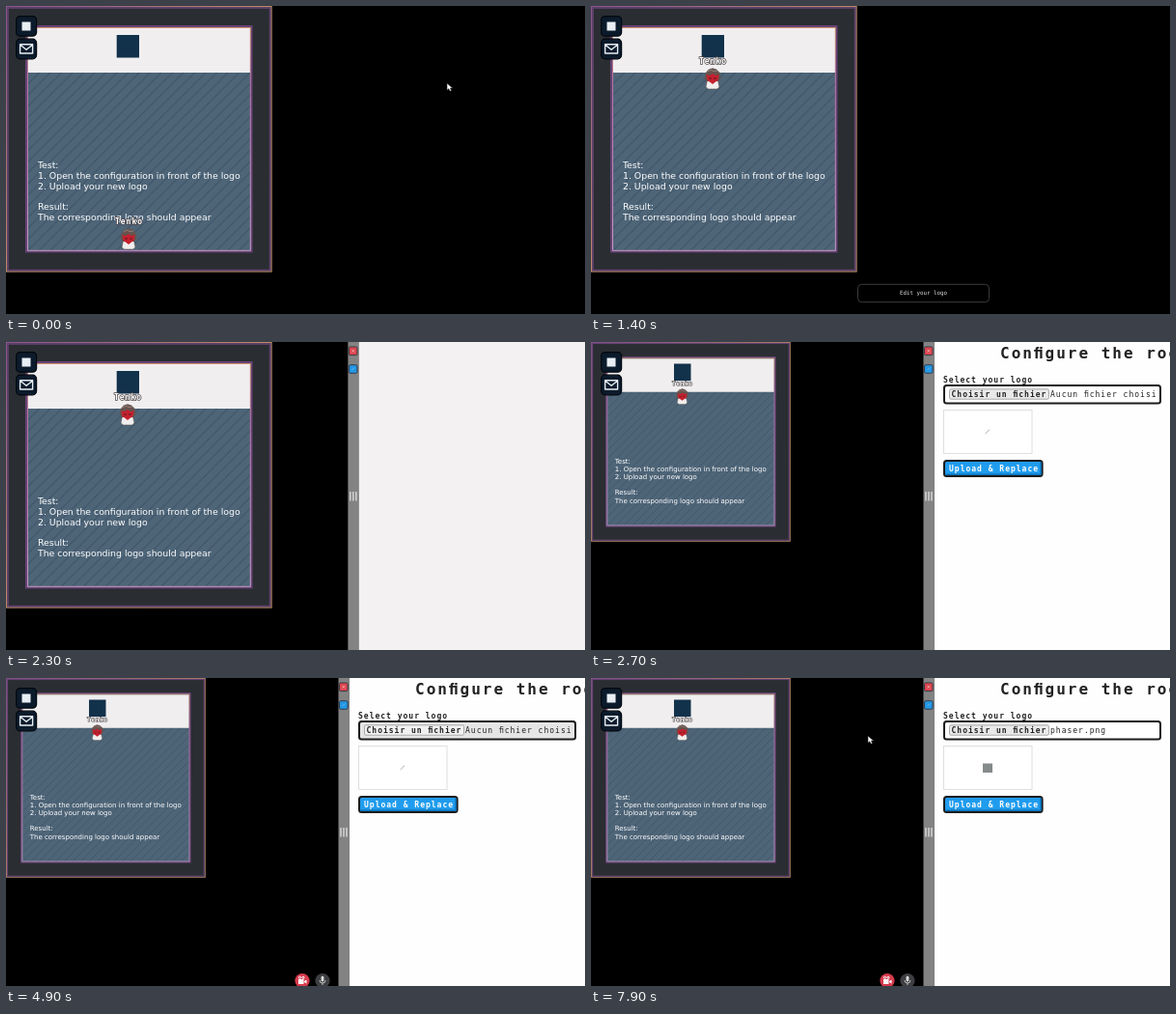
These frames come from a looping animation (600x319 px, 8000 ms). An HTML page:

```html
<!DOCTYPE html>
<html lang="en">
<head>
<meta charset="utf-8">
<title>Edit your logo</title>
<style>
  html, body { margin: 0; width: 100%; height: 100%; overflow: hidden; background: #000; }
  svg { display: block; width: 600px; height: 319px; }
  .sans { font: 9.33px "DejaVu Sans", sans-serif; fill: #fff; }
  .mono { font: 5.8px "DejaVu Sans Mono", monospace; }
  .pixel { font: bold 8px "DejaVu Sans Mono", monospace; letter-spacing: 1px; fill: #222; }
  .title { font-size: 16px; letter-spacing: 2px; }
</style>
</head>
<body>
<svg viewBox="0 0 600 319">
  <defs>
    <linearGradient id="edge" x1="0" y1="0" x2="1" y2="1">
      <stop offset="0" stop-color="#8a5590"/>
      <stop offset=".5" stop-color="#c08a68"/>
      <stop offset="1" stop-color="#b98a62"/>
    </linearGradient>
    <linearGradient id="trim" x1="0" y1="0" x2="0" y2="1">
      <stop offset="0" stop-color="#d0906c"/>
      <stop offset=".25" stop-color="#b873a4"/>
      <stop offset="1" stop-color="#c79ac2"/>
    </linearGradient>
    <pattern id="stripes" width="11.5" height="11.5" patternUnits="userSpaceOnUse">
      <path d="M-1 12.5L12.5 -1M-1 1L1 -1M10.5 12.5L12.5 10.5" stroke="#3d5165" stroke-width="1"/>
    </pattern>
    <path id="arrow" d="M0 0V7.2L1.8 5.7L3.1 8.2L4.6 7.4L3.4 5.1H5.8Z" fill="#fff" stroke="#222" stroke-width=".6"/>
    <path id="hand" d="M-1 0Q0 -1.4 1 0V4L5 5V9L4 12H-1.5L-4.5 7.5Q-4.5 6 -3 6.5L-1 8Z" fill="#fff" stroke="#111" stroke-width=".9"/>
  </defs>
  <rect width="600" height="319"/>

  <g id="game">
    <rect width="275.5" height="275.5" fill="#2a2d31"/>
    <rect x=".6" y=".6" width="274.4" height="274.4" fill="none" stroke="url(#edge)" stroke-width="1.2"/>
    <rect x="2" y="2" width="271.6" height="271.6" fill="none" stroke="#634272" stroke-width="1.6"/>
    <rect x="21" y="21" width="233.5" height="233.5" fill="#4e6578" stroke="#654376" stroke-width="2"/>
    <rect x="23" y="69" width="230" height="184" fill="url(#stripes)"/>
    <rect x="23" y="23" width="230" height="46" fill="#f0eeef"/>
    <rect x="22.5" y="22.5" width="230.8" height="230.8" fill="none" stroke="url(#trim)"/>
    <rect x="114.7" y="30" width="23.3" height="23.5" fill="#12314b"/>
    <g class="sans" id="notes"></g>
    <g id="avatar">
      <path d="M-5.5 2H5.5L7 9L4.5 11H-4.5L-7 9Z" fill="#f1eeee" stroke="#5b5352" stroke-width=".6"/>
      <path d="M-8.5 0L-7 -6L-4 -9.5L0 -10.8L4 -9.5L7.5 -6L8.5 0L6 3H-6Z" fill="#67544f"/>
      <path d="M-5 -7L-2 -9L1 -7.5L5 -8" stroke="#93807a" fill="none"/>
      <path d="M-6.5 -4L-3 -3L0 -5L3 -3L6.5 -4L5.5 2L2.5 4L0 6L-2.5 4L-5.5 2Z" fill="#c5202e"/>
      <path d="M-4 0H-1M1 0H4" stroke="#5c1b24"/>
      <text class="pixel" text-anchor="middle" x=".5" y="-15" style="fill:#fff;stroke:#4a4346;stroke-width:1.4;paint-order:stroke">Tenko</text>
    </g>
  </g>

  <g fill="#0c1b2c" stroke="#03080f" stroke-width="1.2">
    <rect x="10.6" y="10.6" width="21" height="20.6" rx="4"/>
    <rect x="10.6" y="34.2" width="21" height="20.6" rx="4"/>
  </g>
  <rect x="16.5" y="16.5" width="9" height="9" fill="#e8eef4"/>
  <path d="M14.6 39.8H27.6V49H14.6ZM14.8 40.3L21.1 45.3L27.4 40.3" fill="none" stroke="#e8eef4" stroke-width="1.4" stroke-linejoin="round"/>

  <g id="popup">
    <rect x="276.5" y="288.3" width="136" height="18.4" rx="4" fill="#000" stroke="#3c3c3c"/>
    <text class="mono" x="344.5" y="299" text-anchor="middle" fill="#e4e4e4">Edit your logo</text>
  </g>

  <g id="media">
    <circle cx="307" cy="313.5" r="7.6" fill="#d63a4c"/>
    <path d="M303 312H308.5V317H303ZM309 314L311.5 312.5V316.5L309 315Z" fill="#fff"/>
    <g fill="none" stroke="#fff"><circle cx="304.5" cy="310.3" r="1.1"/><circle cx="308" cy="310.3" r="1.1"/></g>
    <circle cx="328" cy="313.5" r="7.6" fill="#3e3f42"/>
    <rect x="326.6" y="308.8" width="2.8" height="5.6" rx="1.4" fill="#ddd"/>
    <path d="M325 313Q325 316 328 316Q331 316 331 313M328 316V318" fill="none" stroke="#ddd" stroke-width=".8"/>
  </g>

  <g id="panel">
    <rect id="sheet" x="11" width="260" height="319"/>
    <rect width="11" height="319" fill="#838383"/>
    <path d="M2.5 155V164.5M5.5 155V164.5M8.5 155V164.5" stroke="#f2f2f2" stroke-width="1.1"/>
    <g stroke="#2c3440" stroke-width=".9">
      <rect x="1" y="5" width="8.6" height="8.6" rx="1.4" fill="#dd4750"/>
      <rect x="1" y="23.7" width="8.6" height="8.6" rx="1.4" fill="#2496e3"/>
    </g>
    <path d="M4 8L6.6 10.6M6.6 8L4 10.6" stroke="#f4b6b9" stroke-width=".8"/>
    <path d="M4 29.3L6.6 26.7" stroke="#77c1f4" stroke-width=".8"/>
  </g>

  <g id="page" class="pixel">
    <text class="title" x="424" y="17">Conﬁgure the room</text>
    <text x="365" y="42">Select your logo</text>
    <rect id="field" x="366" y="45" width="224" height="18.6" rx="2.5" stroke="#1c1c1c" stroke-width="2"/>
    <rect id="choose" x="371.5" y="48.8" width="103" height="10.4" rx="1.5" stroke="#999" stroke-width=".8"/>
    <text x="373.5" y="57">Choisir un ﬁchier</text>
    <text id="file" x="476" y="57" font-weight="normal"></text>
    <rect x="365.5" y="70.5" width="91.5" height="45" fill="#fff" stroke="#dcdcdc" stroke-width=".9"/>
    <path id="missing" d="M408.5 95L413 90.7" stroke="#999" stroke-width=".8"/>
    <rect id="preview" x="406" y="88.5" width="10" height="9.5" fill="#858b8b"/>
    <rect x="366" y="123" width="101.6" height="16" rx="2.5" fill="#209cee" stroke="#1c1c1c" stroke-width="2"/>
    <path d="M367.5 137.3H466V124.5" fill="none" stroke="#0b72ba" stroke-width="1.5"/>
    <text x="371" y="133.5" style="fill:#fff">Upload &amp; Replace</text>
  </g>

  <use id="pointer"/>
</svg>
<script>
const LOOP = 8000;
const $ = id => document.getElementById(id);
const show = (id, on) => $(id).style.display = on ? "" : "none";
const set = (id, name, value) => $(id).setAttribute(name, value);
const move = (id, x, y) => set(id, "transform", `translate(${x} ${y})`);
const ramp = (t, from, to) => Math.min(1, Math.max(0, (t - from) / (to - from)));
const ease = p => (1 - Math.cos(Math.PI * p)) / 2;
const mix = (a, b, p) => a + (b - a) * p;

["Test:", "1. Open the configuration in front of the logo", "2. Upload your new logo", "",
 "Result:", "The corresponding logo should appear"].forEach((line, i) => {
  const text = document.createElementNS("http://www.w3.org/2000/svg", "text");
  text.setAttribute("x", 33);
  text.setAttribute("y", 168 + i * 10.8);
  text.textContent = line;
  $("notes").append(text);
});

// Pointer legs: start, end, x1, y1, x2, y2
const legs = [
  [0, 300, 457, 80, 457, 80],
  [2900, 3600, 360, 210, 425, 59],
  [3600, 4500, 425, 59, 425, 59],
  [6500, 7000, 425, 59, 420, 66],
  [7000, 7500, 420, 66, 207, 79],
  [7500, 7900, 207, 79, 207, 79],
  [7900, 8000, 287, 60, 287, 60],
];

function drawPointer(t) {
  const leg = legs.find(([a, b]) => t >= a && t < b);
  show("pointer", leg);
  if (!leg) return;
  const [a, b, x1, y1, x2, y2] = leg;
  const p = ease(ramp(t, a, b)), x = mix(x1, x2, p), y = mix(y1, y2, p);
  const overField = x > 365 && y > 44 && y < 65;
  set("pointer", "href", overField ? "#hand" : "#arrow");
  move("pointer", x, y);
}

function draw(t) {
  const walk = ramp(t, 100, 1250);
  const step = walk > 0 && walk < 1 ? Math.abs(Math.sin(t / 90)) * 0.6 : 0;
  move("avatar", mix(127, 126, walk), mix(241, 75, walk) - step);
  set("game", "transform", `scale(${t < 2400 ? 1 : 0.75})`);

  show("popup", t >= 900 && t < 1950);
  show("media", t >= 2800);

  show("panel", t >= 2058);
  move("panel", mix(600, 344.5, ease(ramp(t, 2058, 2336))), 0);
  const loaded = t >= 2600, chosen = t >= 6500, hover = t >= 3500 && !chosen;
  set("sheet", "fill", loaded ? "#fefefe" : "#f3f1f2");
  show("page", loaded);
  set("field", "fill", hover ? "#e5e5e5" : "#fff");
  set("choose", "fill", hover ? "#f1f1f1" : "#e9e9e9");
  $("file").textContent = chosen ? "phaser.png" : "Aucun ﬁchier choisi";
  show("missing", !chosen);
  show("preview", chosen);
  drawPointer(t);
}

const start = performance.now();
function tick() {
  draw((performance.now() - start) % LOOP);
  requestAnimationFrame(tick);
}
tick();
</script>
</body>
</html>
```
